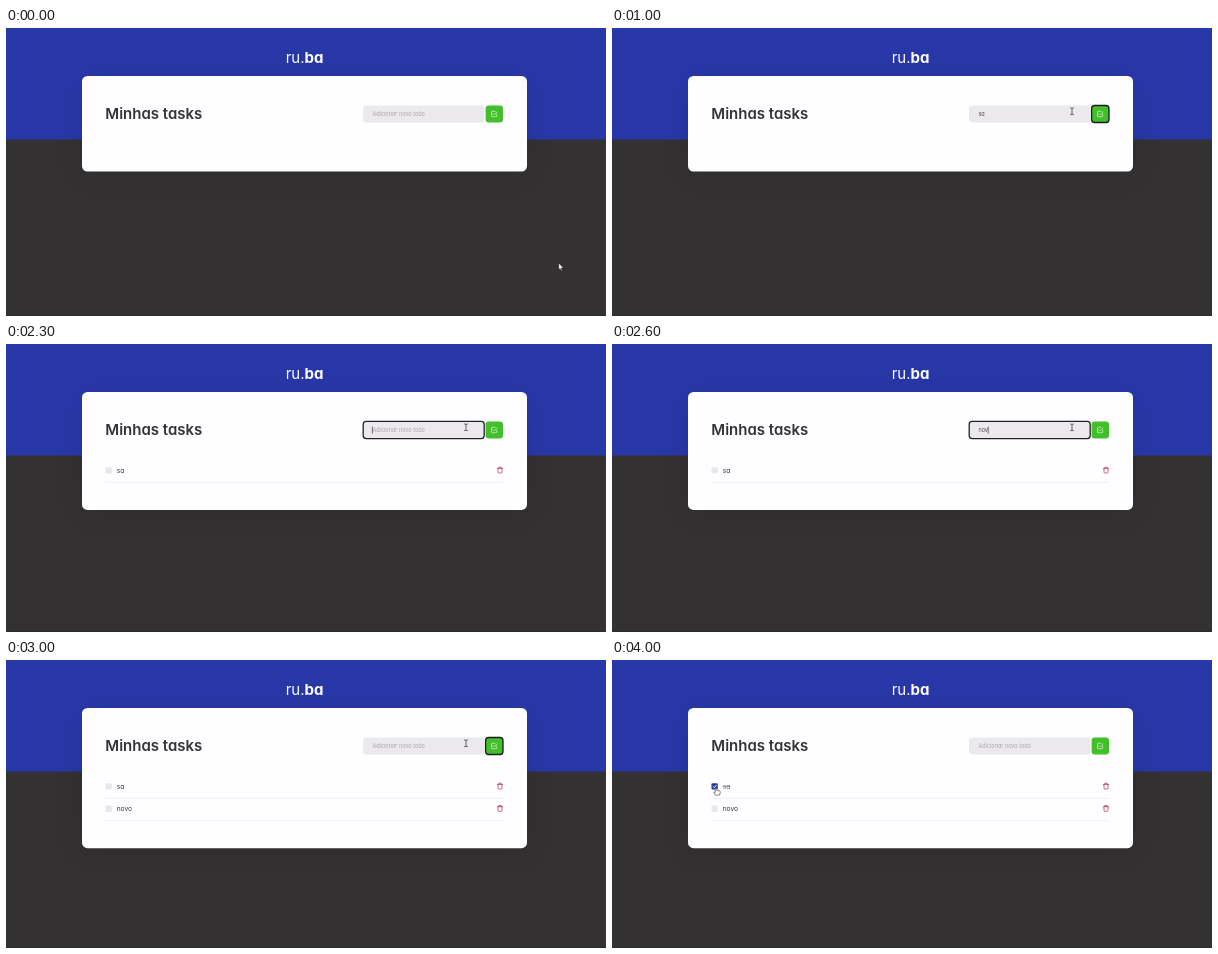
An HTML page for the animation above (4100 ms loop, 600 px wide and 288 px high).

```html
<!DOCTYPE html>
<html lang="pt">
<head>
<meta charset="utf-8">
<title>Minhas tasks</title>
<style>
  html, body { margin: 0; width: 100%; height: 100%; overflow: hidden; background: #333132; }
  svg { display: block; width: 600px; height: 288px; }
  text {
    font-family: Inter, "Open Sans", sans-serif;
    font-feature-settings: "cv11";
    fill: #35323a;
  }
  .logo { font-size: 15px; font-weight: 400; fill: #fff; }
  .logo tspan { font-weight: 650; }
  .title { font-size: 15px; font-weight: 600; }
  .field { font-size: 5.5px; }
  .item { font-size: 6.6px; }
  .done { text-decoration: line-through; opacity: .7; }
  .line { fill: none; stroke-linecap: round; stroke-linejoin: round; }
</style>
</head>
<body>
<svg viewBox="0 0 600 288">
  <defs>
    <filter id="soft" x="-30%" y="-80%" width="160%" height="260%">
      <feGaussianBlur stdDeviation="16"/>
    </filter>
    <g id="row">
      <path d="M99.5 138.4H497" stroke="#efedf0" stroke-width=".8"/>
      <g class="line" stroke="#b8365c" stroke-width=".75">
        <path d="M491.3 124.4H496.7M492.8 124.2V123.2H495.2V124.2M492 124.6V128.2Q492 129 492.8 129H495.2Q496 129 496 128.2V124.6"/>
      </g>
    </g>
  </defs>

  <rect width="600" height="288" fill="#333132"/>
  <rect width="600" height="111.5" fill="#2838a8"/>
  <rect y="287" width="600" height="1" fill="#2c292a"/>
  <text class="logo" x="298.6" y="34.8" text-anchor="middle">ru.<tspan>ba</tspan></text>

  <rect id="shadow" x="76" y="50" width="445" rx="6" opacity=".11" filter="url(#soft)"/>
  <rect id="card" x="76" y="48" width="445" rx="5.5" fill="#fefdff"/>
  <text class="title" x="99.3" y="91.3">Minhas tasks</text>

  <path d="M360 77.5H478.3V94.5H360Q357 94.5 357 91.5V80.5Q357 77.5 360 77.5Z" fill="#ebe9eb"/>
  <rect id="inputRing" x="357.2" y="77.4" width="121" height="17.2" rx="3" fill="none" stroke="#242226" stroke-width="1.3"/>
  <text id="field" class="field" x="366.4" y="88"></text>
  <path id="caret" d="M0 82.6V89.6" stroke="#333" stroke-width=".7"/>

  <rect x="479.6" y="77.5" width="17.4" height="17" rx="3" fill="#43bf2b"/>
  <rect id="buttonRing" x="479.6" y="77.5" width="17.4" height="17" rx="3" fill="none" stroke="#14201a" stroke-width="1.3"/>
  <path class="line" d="M490.7 86V88Q490.7 88.7 490 88.7H486.2Q485.5 88.7 485.5 88V84Q485.5 83.3 486.2 83.3H489.2M487 85.7L488.2 86.9L491 83.9" stroke="#d8f5d2" stroke-width=".7"/>

  <g id="rows"></g>

  <g id="arrow">
    <path d="M0 0V6.8L1.5 5.4L2.5 7.7L3.6 7.2L2.6 5H4.7Z" fill="#fff" stroke="#111" stroke-width=".5"/>
  </g>
  <g id="beam" class="line">
    <path d="M-1.5 -3.4Q0 -3.4 0 -2.6Q0 -3.4 1.5 -3.4M0 -2.6V2.8M-1.5 3.4Q0 3.4 0 2.6Q0 3.4 1.5 3.4" stroke="#444" stroke-width=".8"/>
  </g>
  <g id="hand">
    <path d="M-.7 .4Q0 -.6 .7 .4V2.6L3.6 3.2Q4.4 3.5 4.3 4.3L3.6 7.3H-.6L-2.2 4.8Q-2.2 3.9 -.7 4.6Z" fill="#fff" stroke="#222" stroke-width=".55"/>
  </g>
</svg>
<script>
const LOOP = 4100, STEP = 100, ROW = 22.3;
const $ = id => document.getElementById(id);
const show = (el, on) => el.setAttribute("visibility", on ? "visible" : "hidden");
const clamp = v => Math.max(0, Math.min(1, v));
const ease = v => v * v * (3 - 2 * v);
const mix = (a, b, v) => a + (b - a) * v;

const START = [552.7, 235], INPUT = [460, 83.3], OVER = [89, 128], CHECK = [104, 127.8];

// Each entry: word, first focus, button focus, submit
const tasks = [
  { word: "sa", focus: 700, tab: 1000, add: 1400 },
  { word: "novo", focus: 2300, tab: 2800, add: 3000 }
];
const CLICK = 4000;

const rows = tasks.map((task, i) => {
  const g = document.createElementNS("http://www.w3.org/2000/svg", "g");
  g.setAttribute("transform", `translate(0 ${i * ROW})`);
  g.innerHTML = `<use href="#row"/>
    <rect class="box" x="99.5" y="123.3" width="6.3" height="6.3" rx="1"/>
    <path class="line tick" d="M101.1 126.5L102.3 127.7L104.4 125.2" stroke="#fff" stroke-width=".9"/>
    <text class="item" x="110.7" y="128.6">${task.word}</text>`;
  $("rows").append(g);
  return g;
});

function pointer(t) {
  const along = (a, b, from, to) => {
    const v = ease(clamp((t - from) / (to - from)));
    return [mix(a[0], b[0], v), mix(a[1], b[1], v)];
  };
  if (t < 3100) return along(START, INPUT, 0, 500);
  if (t < 3500) return along(INPUT, OVER, 3100, 3500);
  return along(OVER, CHECK, 3500, 3700);
}

function drawPointer(t) {
  const [x, y] = pointer(t);
  const inside = (l, r, top, bottom) => x > l && x < r && y > top && y < bottom;
  const kind = inside(357, 478, 77, 95) ? "beam" : inside(99, 106, 123, 130) ? "hand" : "arrow";
  for (const id of ["arrow", "beam", "hand"]) show($(id), id === kind);
  $(kind).setAttribute("transform", `translate(${x} ${y})`);
}

function drawForm(t) {
  const task = tasks.find(k => t >= k.focus && t < k.add);
  const typing = !!task && t < task.tab;
  const typed = task ? task.word.slice(0, Math.floor((t - task.focus) / STEP)) : "";
  const field = $("field");
  field.textContent = typed || "Adicionar novo todo";
  field.style.fill = typed ? "#504d53" : "#aaa7ab";
  const caretX = 366.4 + (typed ? field.getComputedTextLength() + .3 : 0);
  $("caret").setAttribute("transform", `translate(${caretX} 0)`);
  show($("caret"), typing);
  show($("inputRing"), typing);
  show($("buttonRing"), t < CLICK && tasks.some((k, i) => {
    const next = tasks[i + 1];
    return t >= k.tab && (!next || t < next.focus);
  }));
}

function drawList(t) {
  const count = tasks.filter(k => t >= k.add).length;
  const height = 95.6 + count * ROW;
  $("card").setAttribute("height", height);
  $("shadow").setAttribute("height", height);
  rows.forEach((row, i) => {
    const done = i === 0 && t >= CLICK;
    row.style.display = i < count ? "" : "none";
    row.querySelector(".box").style.fill = done ? "#2838a8" : "#e9e7ea";
    row.querySelector(".tick").style.display = done ? "" : "none";
    row.querySelector("text").classList.toggle("done", done);
  });
}

function frame(now) {
  const t = Math.floor((now % LOOP) / STEP) * STEP;
  drawForm(t);
  drawList(t);
  drawPointer(t);
  requestAnimationFrame(() => frame(performance.now() - begin));
}

const begin = performance.now();
frame(0);
</script>
</body>
</html>
```
